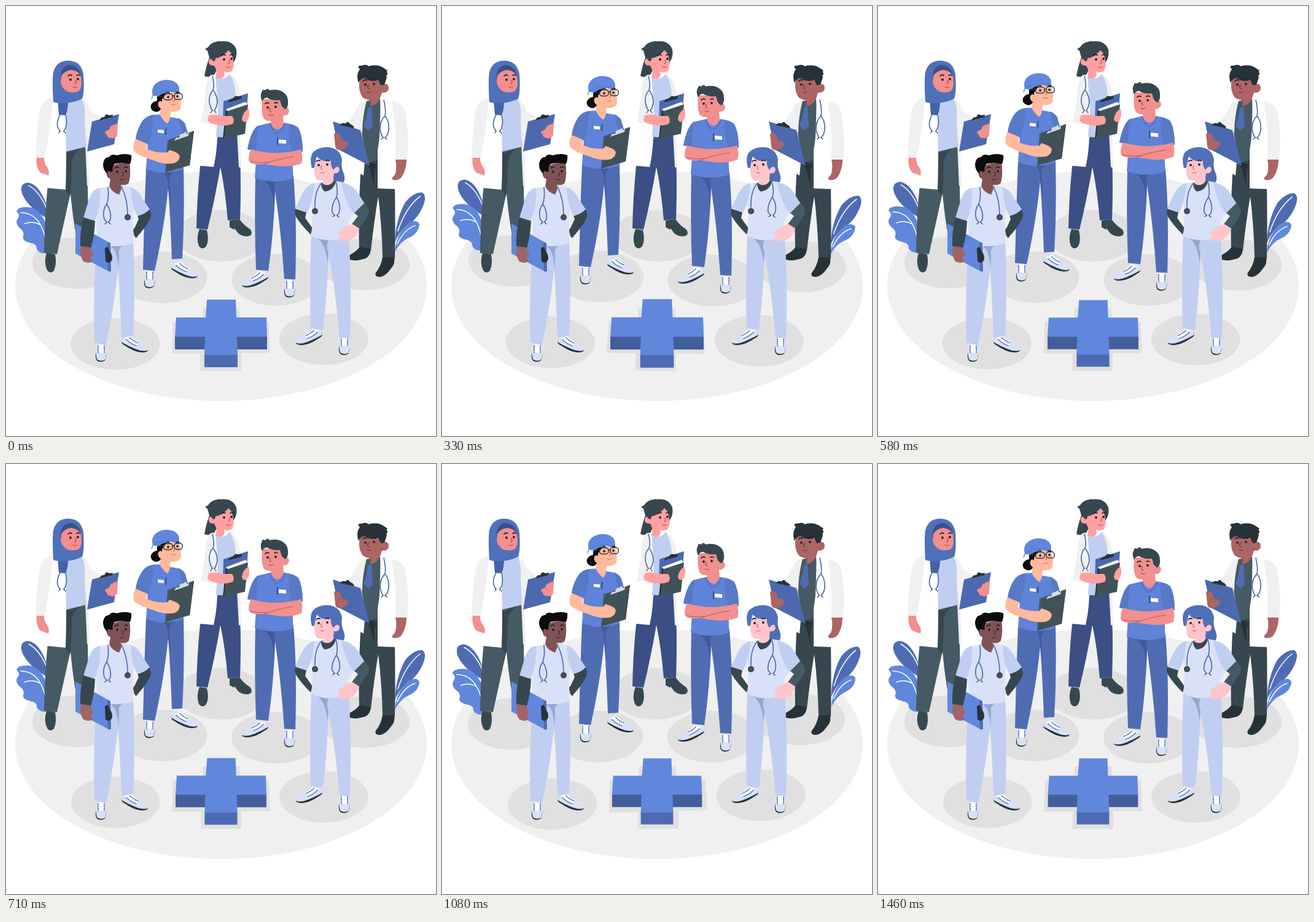
Recreate the animation shown at these times as an HTML page. Size 700 px wide and 700 px high, loop 1500 ms.

```html
<!DOCTYPE html>
<html lang="en">
<head>
<meta charset="utf-8">
<title>Medical team</title>
<style>
html, body { margin: 0; width: 100%; height: 100%; overflow: hidden; background: #fff; }
svg { display: block; width: 100vw; height: 100vh; }
.blue { fill: #6087dc } .shade { fill: #5779c6 } .navy { fill: #4f6cb3 } .deep { fill: #3b4f85 }
.royal { fill: #4f71ba } .scrub { fill: #5e83d8 } .board { fill: #4c69af }
.pale { fill: #c0cff1 } .ice { fill: #d8e1f7 } .white { fill: #fff } .grey { fill: #f0f0f0 } .fold { fill: #94a6d2 }
.slate { fill: #455a64 } .dark { fill: #37474f } .cover { fill: #415158 } .ink { fill: #263238 } .black { fill: #0c0c0e }
.rose { fill: #f28f8f } .pink { fill: #ffa0a0 } .peach { fill: #ffb99d } .blush { fill: #ffc5cb }
.brown { fill: #7f5355 } .clay { fill: #ad6465 }
.line { fill: none; stroke: #4f6cb3; stroke-width: 1.7; stroke-linecap: round }
.vein { fill: none; stroke: #fff; stroke-width: 1.5; stroke-linecap: round }
.thin { fill: none; stroke: #37474f; stroke-width: 1.2; stroke-linecap: round }
</style>
</head>
<body>
<svg viewBox="0 0 700 700">
<defs>
  <g id="side">
    <path class="ink" d="M0 11Q0 14 6 17Q20 27 33 28Q44 28 43 23L1 7Z"/>
    <path class="ice" d="M1 5L15 0Q25 10 37 16Q44 20 43 24Q37 28 22 22Q10 17 0 11Z"/>
    <path class="white" d="M5 4L15 1Q22 8 29 12L24 18Q12 12 5 4Z"/>
    <path class="line" stroke-dasharray="1.5 2" d="M8 7Q15 14 24 17M14 4Q20 10 28 13"/>
  </g>
  <g id="front">
    <path class="ink" d="M0 15Q-1 26 3 28Q9 31 15 27Q18 22 17 14Z"/>
    <path class="ice" d="M1 0L17 1Q18 15 16 25Q9 30 2 25Q-1 14 1 0Z"/>
    <path class="white" d="M4 1L14 1L14 14Q9 16 4 13Z"/>
    <path class="line" stroke-dasharray="1.5 2" d="M4 3V14M14 3V14"/>
  </g>
</defs>

<ellipse class="grey" cx="350" cy="456" rx="335" ry="187"/>
<g id="shadows" fill="#e0e0e0">
  <path d="M320 492H380L381 514H428L430 565H383V594H317V566H270L272 514H320Z"/>
</g>

<g id="plants">
  <path class="navy" d="M66 346Q34 327 26 306Q21 289 36 288Q54 291 65 322Z"/>
  <path class="vein" d="M37 293Q54 302 66 330"/>
  <path class="blue" d="M66 403Q54 404 50 396Q51 388 40 386Q26 383 28 376Q31 368 22 362Q14 354 19 347Q24 341 17 335Q19 327 36 328Q56 329 66 358Z"/>
  <path class="vein" d="M24 337Q54 337 64 378M30 355Q43 350 56 357"/>
  <path class="navy" d="M633 384Q635 345 650 319Q664 302 678 303Q684 308 681 319Q673 345 650 359Q640 368 633 384Z"/>
  <path class="vein" d="M674 309Q650 328 638 366"/>
  <path class="blue" d="M633 400Q636 369 655 353Q668 346 673 354Q672 370 655 377Q642 383 633 400Z"/>
  <path class="vein" d="M666 357Q648 363 637 387"/>
</g>

<g id="cross">
  <path fill="#425e9b" d="M275 538H425V559H275Z"/>
  <path fill="#4d6bb2" d="M323 566H377V588H323Z"/>
  <path class="blue" d="M327 478H374L375 507H424L425 538.500H376L377 568H323L324 538.500H275L277 507H325Z"/>
</g>

<g id="chief">
  <path class="dark" d="M323 114Q326 97 331 84L328 73L324 70L329 67Q334 58 349 57L356 80L338 114Q330 117 323 114Z"/>
  <path class="deep" d="M316 261L338 240L345 211L378 208Q384 262 381 347L361 349Q357 300 349 262Q340 315 328 364L310 362Q311 310 316 261Z"/>
  <path class="dark" d="M315 363L327 365Q331 381 326 391Q320 398 314 391Q309 378 315 363ZM364 349L380 347Q387 357 397 363Q403 370 397 374Q387 377 378 370L372 362L371 364L364 360Z"/>
  <path class="grey" d="M376 205L381 205L383 264L379 262Z"/>
  <path class="white" d="M335 112Q325 116 323 140Q317 180 318 194L315 260L338 262Q346 225 343 195L347 150L340 112Z"/>
  <path class="pale" d="M341 114Q352 124 364 111Q377 120 377 148L356 172L355 214L342 213L345 165Z"/>
  <path class="grey" d="M333 113Q324 121 324 152Q320 172 317 190L331 191L335 180L345 178Q345 130 333 113ZM365 112Q378 116 382 146L374 149Q374 125 365 112Z"/>
  <path class="pink" d="M340 86Q343 74 361 72Q370 77 371 89Q371 104 366 107Q360 109 355 107L356 113Q352 122 341 116L343 106L339 97Q329 98 330 89Q333 82 340 89Z"/>
  <path class="dark" d="M335 88Q325 68 346 58Q369 54 375 71Q377 84 370 92Q370 78 362 72Q352 84 341 85Q341 90 338 90Z"/>
  <path class="line" d="M336 114Q340 128 337 137Q330 144 331 157Q333 166 336 170M337 137Q344 145 344 158Q342 167 339 170"/>
  <path class="thin" d="M336 170L333 174M339 170L342 174"/>
  <path class="board" d="M354 155L394 142L391 180L353 190Z"/>
  <path class="ink" d="M361 157Q364 151 369 151Q373 145 377 147L384 147L383 151Z"/>
  <path class="white" d="M358 168L390 156L394 161L361 172Z"/>
  <path class="cover" d="M361 171L394 160L389 208L353 216Z"/>
  <path class="ink" d="M358 169L361 171L355 214L353 216Z"/>
  <path class="pink" d="M330 178Q342 175 352 179L368 179Q373 185 369 192Q355 197 341 193Q328 190 328 185ZM395 167Q386 172 384 183Q385 191 392 188Q397 181 396 172Z"/>
</g>

<g id="hijab">
  <path class="slate" d="M98 237Q115 227 131 229Q134 300 134 392H117Q108 340 105 305Q97 340 83 404L62 402Q63 340 68 292L97 296Z"/>
  <path class="dark" d="M98 240L121 232Q110 240 107 252Q107 285 104 310L97 300Z"/>
  <path class="dark" d="M66 402L80 404Q83 420 78 431Q72 437 67 430Q61 418 66 402Z"/>
  <path class="grey" d="M122 150Q133 155 138 171L152 179L150 222L134 230L136 293L132 293L128 200Z"/>
  <path class="white" d="M80 150Q62 153 67 210L65 296L97 299Q99 240 97 200L101 155Z"/>
  <path class="pale" d="M100 155L122 150Q130 160 128 185Q129 212 131 229L98 237Q96 190 100 155Z"/>
  <path class="grey" d="M77 149Q57 153 54 175Q48 215 49 248L62 249Q72 205 77 149Z"/>
  <path class="rose" d="M50 247L62 247Q62 257 68 264Q71 270 69 276L61 273Q54 272 52 265Q48 256 50 247Z"/>
  <path fill="#4562a6" d="M84 152L101 154Q101 170 97 178L86 177Z"/>
  <path class="royal" d="M77 156Q75 122 77 108Q82 89 101 89Q122 89 126 111Q128 140 124 151Q112 157 97 158Q84 159 77 156Z"/>
  <path class="deep" d="M89 122Q87 97 105 96Q121 99 122 116Z"/>
  <path class="rose" d="M90 114Q95 105 107 104Q119 106 122 115Q125 133 118 139Q110 142 102 140Q91 136 89 124Z"/>
  <path class="line" d="M89 176Q82 186 84 197L88 204M97 177Q100 190 97 199L94 204"/>
  <path class="thin" d="M88 204L86 207M94 204L97 207"/>
  <path class="board" d="M140 188L184 176L176 225L132 237Z"/>
  <path class="ink" d="M152 186Q155 180 160 181Q163 174 168 178L174 177L173 181Z"/>
  <path class="rose" d="M182 191Q176 192 170 196Q169 202 163 203Q159 207 164 209Q163 213 170 215Q179 217 181 210Z"/>
</g>

<g id="tie">
  <path class="dark" d="M579 248L607 246L606 296H633Q634 350 633 411L613 410Q612 360 606 310Q600 345 594 398L575 396Q573 320 579 248Z"/>
  <path class="ink" d="M583 251L603 258Q597 275 601 297L592 264Z"/>
  <path class="ink" d="M576 392L594 396Q593 407 585 411Q570 416 560 413Q552 411 560 405Q570 400 576 392ZM613 409L632 409Q634 420 627 427Q618 440 609 441Q599 441 602 434Q610 425 613 409Z"/>
  <path class="white" d="M578 225L584 255L582 276L577 273Z"/>
  <path class="slate" d="M586 155L610 151L607 250L588 256L578 200Z"/>
  <path class="grey" d="M587 154Q574 156 571 168L556 192L580 206Q580 180 587 154Z"/>
  <path class="white" d="M609 150Q625 152 632 158Q640 200 633 298L605 297L605 235Q612 195 609 150Z"/>
  <path class="grey" d="M628 155Q648 157 651 178Q657 215 653 251L633 249Q637 210 628 155Z"/>
  <path class="clay" d="M634 250L652 250Q652 265 645 277Q640 285 630 283Q626 281 633 275Q637 264 634 250Z"/>
  <path class="clay" d="M577 118Q588 112 606 119L612 128Q623 124 623 134Q622 142 612 141L609 150Q604 162 593 163L594 154Q584 152 580 148Q574 138 575 126Z"/>
  <path class="navy" d="M589 166L595 163L597 196L590 203L582 195Q588 180 589 166Z"/>
  <path class="ink" d="M573 123Q570 110 576 103Q570 96 579 97Q587 94 590 98Q605 94 615 101L621 105Q618 108 622 110Q618 113 620 116L616 128L610 129L606 120Q592 125 584 117Q577 118 574 125Z"/>
  <path class="line" d="M615 153Q619 170 617 179Q609 186 609 201Q611 211 614 214M617 179Q624 187 623 202Q621 212 617 214"/>
  <path class="thin" d="M614 214L611 217M617 214L620 217"/>
  <path class="board" d="M532 188L577 202L592 260L542 234Z"/>
  <path class="ink" d="M544 194Q546 189 553 191Q557 186 560 192Q566 194 567 199Z"/>
  <path class="clay" d="M534 208Q538 206 543 208L548 219Q557 220 557 225Q555 233 545 234Q537 236 536 228Z"/>
</g>

<g id="nurse">
  <use href="#side" x="269" y="416"/><use href="#front" x="225" y="431"/>
  <path class="navy" d="M228 264L289 262Q291 340 287 412L270 413Q268 350 264 297Q258 360 242 432L223 430Q225 340 228 264Z"/>
  <path class="deep" d="M257 272L277 269Q267 274 266 282L268 325L264 297Q265 280 257 272Z" opacity=".6"/>
  <path class="black" d="M246 148Q253 142 262 142L256 152L253 167Q250 174 243 173Q234 170 236 162Q239 156 246 155Z"/>
  <path class="scrub" d="M238 178L255 177L269 182Q288 184 292 193L297 214L289 220Q286 245 289 266Q258 278 228 266L231 222Z"/>
  <path class="shade" d="M239 178Q224 180 217 197Q212 207 211 218Q220 225 231 226Q240 205 239 178ZM280 183Q293 188 297 214L288 217Z"/>
  <path class="peach" d="M254 153Q259 142 271 141Q280 140 283 146Q286 157 284 168Q280 174 268 173L267 182Q266 190 262 192Q255 187 250 177L252 168Q246 164 248 158Q251 153 254 157Z"/>
  <path class="blue" d="M239 146Q236 137 241 130Q248 121 262 121Q276 121 281 131Q283 138 281 144Q266 137 254 144Q247 150 239 146Z"/>
  <path class="thin" style="stroke:#5779c6" d="M239 146Q256 134 281 141M239 146L237 152"/>
  <path class="white" d="M247 202L257 203V208L247 207Z"/><path class="deep" d="M260 199H262L261 211L259 210Z"/>
  <path class="slate" d="M263 219L306 204L299 260L259 272Z"/>
  <path class="cover" d="M266 220L306 204L299 260L261 270Z"/>
  <path fill="#d4dbe2" d="M274 220Q276 214 282 215Q282 208 290 208Q292 203 295 209L298 207L297 212Z"/>
  <path class="peach" d="M211 217L230 225L228 233Q245 241 263 239L266 235Q281 239 283 245Q282 255 272 257Q255 259 240 252Q214 244 208 236Q206 226 211 217Z"/>
</g>

<g id="folded">
  <use href="#side" transform="translate(427 431) scale(-1 1)"/><use href="#front" x="453" y="446"/>
  <path class="navy" d="M406 278L468 277Q474 350 471 446L453 445Q448 370 438 302Q436 370 427 432L407 430Q404 350 406 278Z"/>
  <path class="deep" d="M420 285L440 286Q434 292 438 302L436 340Q437 295 420 285Z" opacity=".6"/>
  <path class="scrub" d="M430 191L453 191Q470 193 476 199Q483 212 483 237L467 244Q466 265 468 281Q440 292 405 281L408 237L393 234Q398 205 409 196Z"/>
  <path class="shade" d="M461 193Q476 196 480 212Q483 225 483 238L465 236Q458 212 461 193ZM411 195Q400 203 393 234L408 238Q406 220 411 195Z"/>
  <path class="thin" style="stroke:#4f6cb3" d="M430 192Q434 206 440 209Q451 204 454 192"/>
  <path class="rose" d="M418 152L447 153L449 167Q460 162 461 172Q459 180 451 179L452 192Q443 211 432 194L431 188Q422 188 419 183Q414 168 418 152Z"/>
  <path class="dark" d="M416 154Q413 144 417 140Q416 136 422 138Q426 133 429 138Q443 135 451 141Q459 146 459 156Q460 164 455 169L449 165L446 154Q432 155 425 150Q419 150 417 156Z"/>
  <path class="white" d="M444 218L456 219V225L444 224Z"/><path class="deep" d="M441 214H443V227H441Z"/>
  <path class="rose" d="M399 234Q420 240 440 240Q465 239 480 234Q484 246 481 257Q465 264 440 261L420 258Q399 261 395 252Q395 240 399 234Z"/>
  <path class="thin" style="stroke:#b85f63" d="M421 258Q440 250 468 246M398 254Q415 257 427 255"/>
</g>

<g id="hip">
  <use href="#side" x="188" y="536"/><use href="#front" x="146" y="550"/>
  <path class="pale" d="M148 384L207 384Q211 450 207 537L188 540Q185 470 183 425Q176 490 163 552L144 548Q141 470 148 384Z"/>
  <path class="fold" d="M170 391L191 389Q182 394 184 405L183 440Q184 398 170 391Z"/>
  <path class="clay" d="M207 363L216 358L214 377L208 374Z"/>
  <path class="dark" d="M214 341L233 330Q238 339 235 346Q225 364 211 378L207 366L216 347Z"/>
  <path class="ice" d="M150 297L167 294L187 292Q205 293 212 300L218 335L208 330Q205 360 208 386Q178 396 148 386L147 340Q148 310 150 297Z"/>
  <path class="pale" d="M153 296Q140 298 135 315L126 345L144 351Q155 325 153 296ZM203 295Q215 299 222 313L234 331Q226 339 214 342Q204 325 203 295Z"/>
  <path class="brown" d="M170 262Q182 254 201 255Q204 272 200 288Q195 293 187 291L188 298L184 307Q172 303 168 293L170 282Q163 279 164 272Q165 266 171 268Z"/>
  <path class="black" d="M160 267Q156 258 160 251Q162 246 168 246Q171 240 180 243Q195 239 204 243Q205 250 202 257Q187 254 177 257Q172 262 174 269L170 270Q165 265 165 274Z"/>
  <path class="line" d="M166 295Q168 312 164 322Q156 334 160 347L164 352M164 322Q172 335 170 347L167 352M188 294Q198 315 198 339"/>
  <path class="thin" d="M164 352L161 355M167 352L170 355"/>
  <circle class="dark" cx="198" cy="344" r="5"/><circle class="slate" cx="198" cy="344" r="2.500"/>
  <path class="blue" d="M113 354L168 385L169 433L113 403Z"/>
  <path class="navy" d="M168 385L170 386L171 432L166 432L165 384Z"/>
  <path class="ink" d="M161 394L166 392L169 400Q173 403 173 412Q171 418 166 418L162 416Z"/>
  <path class="dark" d="M126 344L145 350Q144 375 138 394L121 391Q120 368 126 344Z"/>
  <path fill="#a06464" d="M122 391L137 393Q139 401 144 405L138 406L140 416Q136 420 126 416Q119 407 122 391Z"/>
</g>

<g id="braid">
  <use href="#side" transform="translate(515 524) scale(-1 1)"/><use href="#front" x="542" y="539"/>
  <path class="pale" d="M497 373L558 375Q563 450 560 541L543 540Q536 460 525 402Q523 470 516 527L496 525Q494 440 497 373Z"/>
  <path class="fold" d="M507 379L525 382Q520 390 525 402L524 420Q520 386 507 379Z"/>
  <path class="navy" d="M533 240L546 248Q545 262 550 273Q554 286 545 292Q537 285 533 287Z"/>
  <path class="dark" d="M471 330L489 336L487 345L499 362L496 372Q480 356 472 343Q469 336 471 330Z"/>
  <path class="ice" d="M513 287L537 285Q555 287 562 293L572 330L560 345Q553 358 558 376Q525 387 497 374Q500 345 497 322L495 290Z"/>
  <path class="pale" d="M546 288Q565 291 572 303L584 322Q578 332 566 338Q552 320 546 288ZM502 288Q488 292 480 310L471 329L490 336Q500 318 502 288Z"/>
  <path class="dark" d="M513 288L522 286L537 285Q534 300 519 302Q513 298 513 288Z"/>
  <path class="blush" d="M502 256Q512 245 529 252L533 265Q542 257 543 267Q541 274 534 272L532 287Q524 295 515 289L517 284Q508 286 504 280Q500 268 502 256Z"/>
  <path class="royal" d="M498 264Q493 245 501 237Q512 228 527 230Q544 233 547 250L546 262Q538 258 533 267Q528 260 529 252Q512 254 506 245Q503 255 502 263Z"/>
  <path class="line" d="M513 289Q502 302 503 328M537 286Q541 300 538 311Q529 325 531 336L535 341M538 311Q546 325 542 337L539 341"/>
  <path class="thin" d="M535 341L532 343M539 341L542 344"/>
  <circle class="dark" cx="503" cy="334" r="5"/><circle class="slate" cx="503" cy="334" r="2.500"/>
  <path class="slate" d="M583 321Q592 328 591 337Q585 351 574 362L563 355L573 342L567 337Z"/>
  <path class="blush" d="M564 355L575 362Q571 377 560 381Q550 385 540 381Q540 377 546 374Q538 373 543 367Q550 359 564 355Z"/>
</g>
</svg>
<script>
const $ = id => document.getElementById(id);
const add = (parent, markup) => parent.insertAdjacentHTML('beforeend', markup);

const SPOTS = [[115, 419], [255, 442], [350, 374], [439.5, 445.5], [584.5, 420], [178, 550.5], [517.5, 542]];
for (const [x, y] of SPOTS) add($('shadows'), `<ellipse cx="${x}" cy="${y}" rx="72.5" ry="42"/>`);

// Eyes at (x, y) and (x + w, y - 1); dir is where the face looks.
function face(id, x, y, w, dir, tone) {
  const nose = x + w / 2 + dir * 2, lip = x + w / 2 - 3 + dir;
  add($(id), `<g fill="none" stroke-linecap="round">
    <path stroke="#202125" stroke-width="1.7" d="M${x - 4} ${y - 6}q3 -3 6 -1M${x + w - 2} ${y - 7}q3 -2 5 0"/>
    <path stroke="${tone}" stroke-width="1.5" d="M${nose} ${y + 1}q${dir * 3} 4 ${-dir} 6M${lip} ${y + 12}q3 2 6 0"/>
    <g fill="#202125"><circle cx="${x}" cy="${y}" r="1.9"/><circle cx="${x + w}" cy="${y - 1}" r="1.9"/></g></g>`);
}
face('chief', 355, 87, 12, 1, '#c4545f');
face('hijab', 105, 120, 12, 1, '#b4545a');
face('tie', 585, 128, 14, -1, '#743c40');
face('nurse', 264, 149, 15, 1, '#d9785f');
face('folded', 426, 166, 13, -1, '#b04c55');
face('hip', 181, 270, 14, 1, '#4d2b30');
face('braid', 509, 259, 14, -1, '#e0707f');
add($('nurse'), `<g class="thin" style="stroke:#263238;stroke-width:1.4">
  <rect x="256.500" y="143.500" width="14.500" height="10" rx="4"/><rect x="274" y="143" width="13" height="10" rx="4"/>
  <path d="M271 147H274M256 147L248 149"/></g>`);

const LOOP = 1500, FRAMES = 36;
const BEAT = [[0, 1], [8, 1.013], [14, .987], [20, .986], [26, .976], [35, .978]];
function lerp(keys, n) {
  const i = Math.max(1, keys.findIndex(k => k[0] >= n));
  const [a, u] = keys[i - 1], [b, v] = keys[i];
  return u + (v - u) * (n - a) / (b - a);
}

function draw() {
  const t = Math.floor(performance.now() % LOOP / 10) * 10;
  const n = Math.floor((t + 4.9) * FRAMES / LOOP) % FRAMES;
  const p = (n + 1) / FRAMES;
  const lift = -14 * (1 - Math.abs(2 * p - 1));
  const sway = p < .25 ? 4 * p : p < .75 ? 2 - 4 * p : 4 * p - 4;
  for (const id of ['nurse', 'folded']) $(id).setAttribute('transform', `translate(0 ${lift})`);
  $('shadows').setAttribute('transform', `rotate(${sway} 350 463)`);
  $('plants').setAttribute('transform', `rotate(${sway} 350 346)`);
  $('cross').setAttribute('transform', `translate(350 533) scale(${lerp(BEAT, n)}) translate(-350 -533)`);
  requestAnimationFrame(draw);
}
draw();
</script>
</body>
</html>
```
